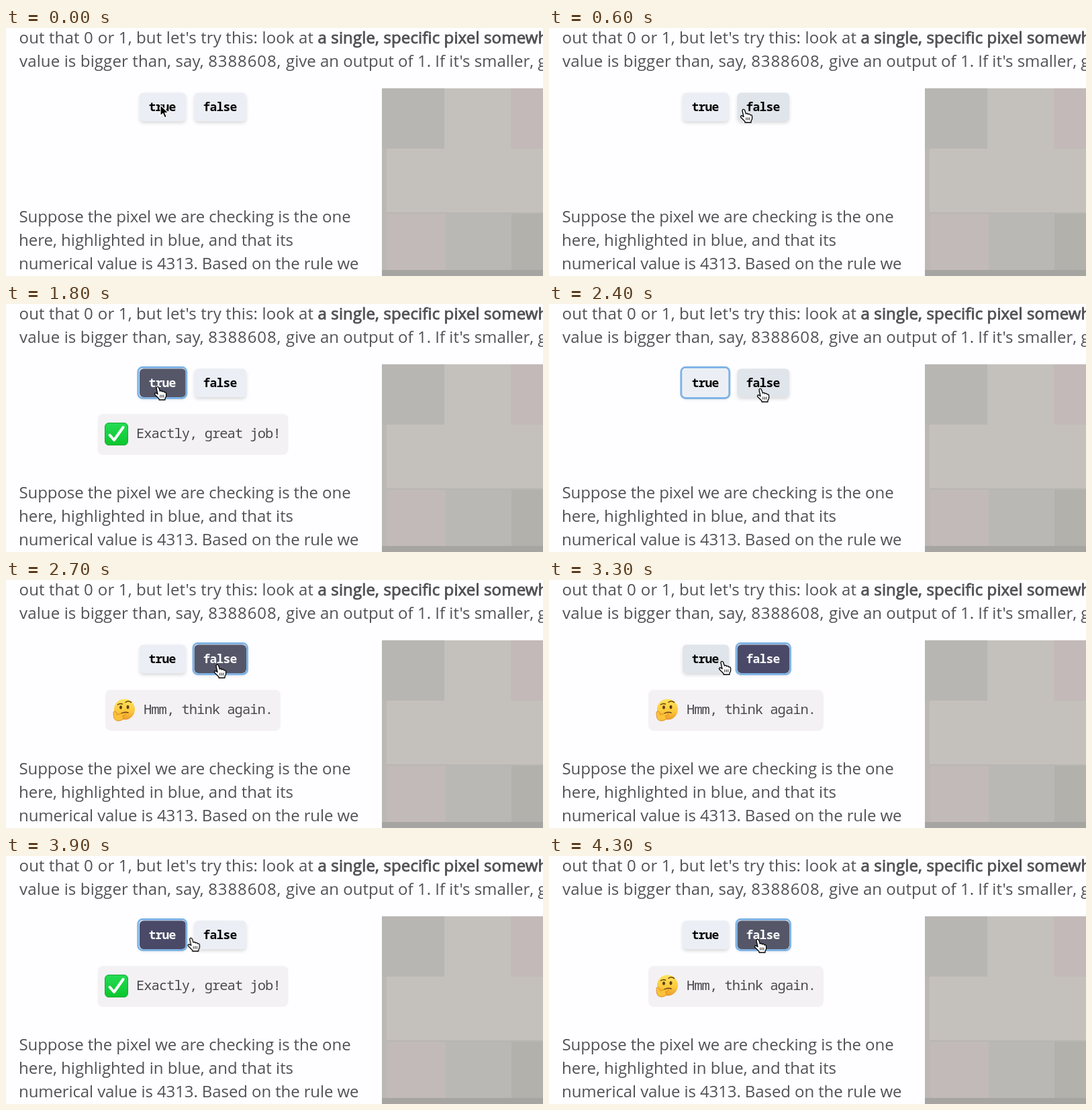
An HTML page for the animation above (4400 ms loop, 800x370 px).

```html
<!DOCTYPE html>
<html lang="en">
<head>
<meta charset="utf-8">
<title>True or false</title>
<style>
  html, body { margin: 0; width: 100%; height: 100%; overflow: hidden; background: #fefdff; }
  svg { display: block; width: 800px; height: 370px; }

  .prose { font: 24px "Open Sans", sans-serif; fill: #525156; white-space: pre; }
  .wide { letter-spacing: .13px; }
  .tight { letter-spacing: -.1px; }
  .digits { letter-spacing: .9px; }
  .strong { stroke: #525156; stroke-width: .9px; }

  .btn text { font: 700 18px "Noto Sans Mono", monospace; letter-spacing: -.8px; fill: currentColor; }
  .btn rect { filter: drop-shadow(0 3px 2.5px #00000022); }
  .ring { fill: none; stroke: #80b4e5; stroke-width: 3; }
  .note text { font: 20.5px "Noto Sans Mono", monospace; letter-spacing: -1px; fill: #4a494f; }
  .note .panel { fill: #f3f1f4; }

  /* Everything shares one 4.4 s loop, held in 100 ms steps. */
  .btn, .ring, .note, #arrow, #hand, #pointer {
    animation: 4.4s step-end infinite;
  }
  #yes { animation-name: yes; }
  #no { animation-name: no; }
  #yesRing { animation-name: yesRing; }
  #noRing { animation-name: noRing; }
  #right { animation-name: right; }
  #wrong { animation-name: wrong; }
  #arrow { animation-name: arrow; }
  #hand { animation-name: hand; }
  #pointer { animation-name: move; }

  @keyframes yes {
    0%, 11.36%, 47.72% { fill: #ebeff5; color: #000; }
    6.81%, 15.9%, 45.45%, 72.72% { fill: #dfe5ea; color: #000; }
    22.72%, 79.54% { fill: #65677b; color: #e6e6ea; }
    25%, 81.81% { fill: #555769; color: #fff; }
    43.18% { fill: #a9adb9; color: #222; }
    88.63% { fill: #4a4a68; color: #fff; }
    93.18% { fill: #dfe5ea; color: #000; }
    95.45%, 100% { fill: #ebeff5; color: #000; }
  }
  @keyframes no {
    0%, 15.9%, 81.81% { fill: #ebeff5; color: #000; }
    11.36%, 50%, 79.54%, 90.9% { fill: #dfe5ea; color: #000; }
    59.09%, 93.18% { fill: #65677b; color: #e6e6ea; }
    61.36%, 95.45%, 100% { fill: #555769; color: #fff; }
    68.18% { fill: #4a4a68; color: #fff; }
  }
  @keyframes yesRing {
    0%, 59.09%, 93.18%, 100% { opacity: 0; }
    22.72%, 79.54% { opacity: 1; }
  }
  @keyframes noRing {
    0%, 79.54% { opacity: 0; }
    59.09%, 93.18%, 100% { opacity: 1; }
  }
  @keyframes right {
    0%, 43.18%, 93.18%, 100% { opacity: 0; }
    22.72%, 79.54% { opacity: 1; }
  }
  @keyframes wrong {
    0%, 79.54% { opacity: 0; }
    59.09%, 93.18%, 100% { opacity: 1; }
  }
  @keyframes arrow {
    0% { opacity: 1; }
    6.81%, 100% { opacity: 0; }
  }
  @keyframes hand {
    0% { opacity: 0; }
    6.81%, 100% { opacity: 1; }
  }
  @keyframes move {
    0% { transform: translate(230px, 115px); }
    4.54% { transform: translate(230px, 115px); animation-timing-function: steps(3); }
    11.36% { transform: translate(288px, 121px); animation-timing-function: steps(1); }
    13.63% { transform: translate(290px, 122px); animation-timing-function: steps(3); }
    20.45% { transform: translate(227px, 124px); }
    22.72% { transform: translate(226px, 124px); }
    43.18% { transform: translate(226px, 124px); animation-timing-function: steps(4); }
    52.27% { transform: translate(313px, 127px); }
    54.54% { transform: translate(315px, 127px); }
    61.36% { transform: translate(315px, 127px); animation-timing-function: steps(5); }
    72.72% { transform: translate(258px, 122px); }
    86.36% { transform: translate(258px, 122px); animation-timing-function: steps(3); }
    93.18%, 100% { transform: translate(311px, 125px); }
  }
</style>
</head>
<body>
<svg viewBox="0 0 800 370">
  <defs>
    <linearGradient id="green" x2="0" y2="1">
      <stop stop-color="#25dc55"/>
      <stop offset="1" stop-color="#0bc62d"/>
    </linearGradient>
    <linearGradient id="skin" x2="0" y2="1">
      <stop stop-color="#ffe45c"/>
      <stop offset=".6" stop-color="#fbc83c"/>
      <stop offset="1" stop-color="#eb9a2b"/>
    </linearGradient>
  </defs>

  <g class="prose">
    <text class="wide" x="19.500" y="23">out that <tspan class="digits">0</tspan> or 1, but let's try this: look at</text>
    <text class="wide strong" x="464.500" y="23">a single, specific pixel somewhere</text>
    <text class="wide" x="20" y="58">value is bigger than, say, <tspan class="digits">8388608</tspan>,</text>
    <text x="417" y="58">give an output of 1. If it's smaller, give</text>
    <text class="tight" x="19.500" y="290">Suppose the pixel we are checking is the one</text>
    <text x="19" y="325">here, highlighted in blue, and that its</text>
    <text class="tight" x="19" y="360">numerical value is 4313. Based on the rule we</text>
  </g>

  <g id="mosaic">
    <path fill="#b8b6b2" d="M560 90h240v280H560z"/>
    <path fill="#bcb8b3" d="M560 180h8v181h-8z"/>
    <path fill="#c4c0bb" d="M653 90h99v90h48v95H568v-95h85z"/>
    <path fill="#c2b9b8" d="M752 90h48v90h-48z"/>
    <path fill="#c2bab8" d="M568 277h87v84h-87z"/>
    <path fill="#b9b8b4" d="M655 277h98v84h-98z"/>
    <path fill="#b3b1ac" d="M753 277h47v84h-47z"/>
    <path fill="#a7a5a1" d="M560 361h240v9H560z"/>
    <path fill="none" stroke="#c7c1bb" d="M567.5 275V180.5H653M568 274.5h232"/>
  </g>

  <g id="yes" class="btn">
    <rect x="199" y="96.500" width="69" height="42.500" rx="6"/>
    <text x="212.500" y="124">true</text>
  </g>
  <g id="no" class="btn">
    <rect x="280.500" y="96.500" width="77.500" height="42.500" rx="6"/>
    <text x="293.500" y="124">false</text>
  </g>
  <rect id="yesRing" class="ring" x="196.800" y="94.600" width="72" height="45.800" rx="6.500"/>
  <rect id="noRing" class="ring" x="279" y="94.600" width="80.500" height="45.800" rx="6.500"/>

  <g id="right" class="note">
    <rect class="panel" x="136.500" y="164" width="284" height="61" rx="8"/>
    <rect x="147.500" y="177.500" width="34" height="33" rx="5.500" fill="url(#green)" stroke="#19a83a"/>
    <path d="M154.500 195.500l6.500 7.500 13.500-19" fill="none" stroke="#fff" stroke-width="4" stroke-linecap="round" stroke-linejoin="round"/>
    <text x="194" y="200">Exactly, great job!</text>
  </g>

  <g id="wrong" class="note">
    <rect class="panel" x="148" y="164" width="261" height="61" rx="8"/>
    <circle cx="176.500" cy="193" r="15.500" fill="url(#skin)"/>
    <g fill="#5f3a14">
      <ellipse cx="171" cy="190" rx="2" ry="2.700"/>
      <ellipse cx="181.500" cy="189.500" rx="2" ry="2.700"/>
    </g>
    <path d="M166.500 186q3-2.500 7-1M178 182.500q4-3.500 8.500 0M172 199q5-3 10-1" fill="none" stroke="#6b4214" stroke-width="1.600" stroke-linecap="round"/>
    <path d="M161 196q2.500-1 3.500 2l1 3 10.500-2.500q3 0 2 2.200l-5 2.300q3 .500 2 3-1.500 4-7 4.200-6 0-7.300-5.200-.700-4-.700-6.500 0-2 1-2.500z" fill="#fbc23a" stroke="#d98a22" stroke-width=".9"/>
    <text x="205" y="200">Hmm, think again.</text>
  </g>

  <g id="pointer" stroke-linejoin="round">
    <path id="arrow" d="M0 0v16l3.700-3.400 2.700 6.200 2.900-1.200-2.700-6.100H12z" stroke="#fff" stroke-width="1.200"/>
    <g id="hand" stroke="#000" stroke-width="1.300">
      <path d="M-2 1.500C-2.300-1 1-1.300 1.800 1.200L3.400 6C4.500 5 6.300 5.400 6.600 6.800 8 5.800 9.500 6.400 9.800 7.800 11.500 7.200 12.600 8.200 12.600 10V13.500C12.500 15 11 16 11 17.500V19H2V17.500L-4 11.500C-5.500 9.500-3.500 8-1.800 9.200L0 10.500z" fill="#fff"/>
      <path d="M3.800 11.500v4M6.300 11.500v4M8.800 11.500v4" stroke-width=".9"/>
    </g>
  </g>
</svg>
</body>
</html>
```
